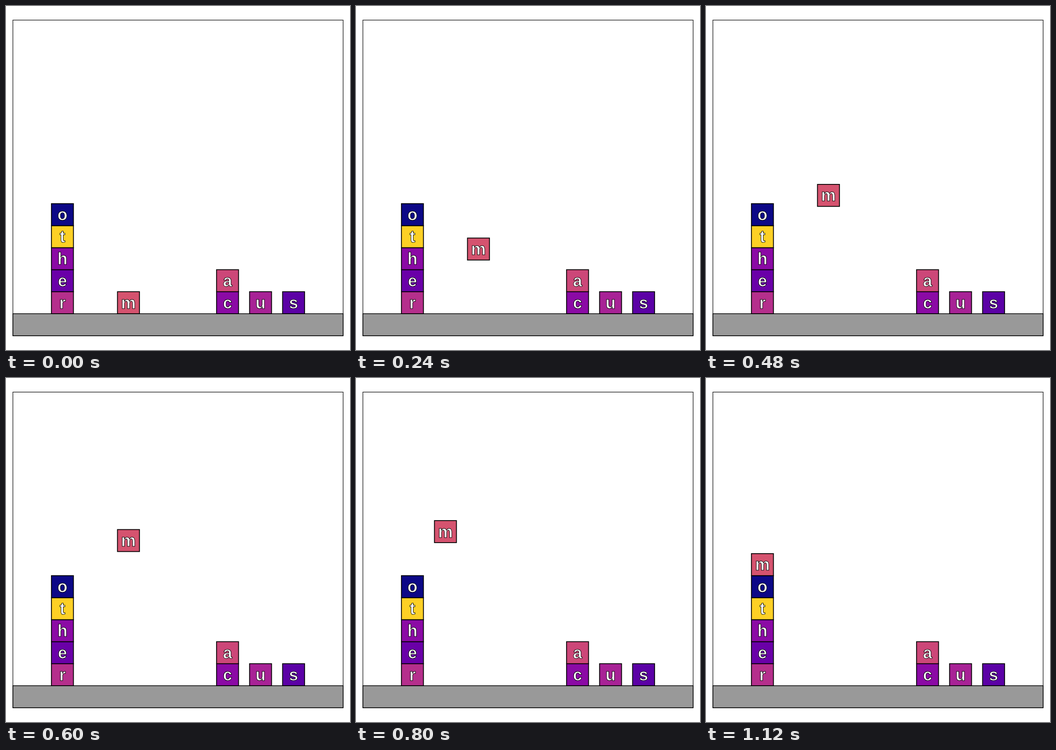
An HTML page that plays this animation: 748 px wide and 748 px high, repeating every 1.16 s.

```html
<!DOCTYPE html>
<html lang="en">
<head>
<meta charset="utf-8">
<title>Stacking blocks</title>
<style>
  html, body { margin: 0; width: 100%; height: 100%; overflow: hidden; background: #fff; }
  svg { display: block; width: 100vw; height: 100vh; }
  rect { stroke: #000; stroke-width: 1.8; }
  text {
    font: bold 36px "Liberation Sans", Arial, sans-serif;
    text-anchor: middle; fill: #fff; stroke: #000; stroke-width: 1;
  }
</style>
</head>
<body>
<svg id="stage" viewBox="0 0 748 748"></svg>
<script>
const NS = "http://www.w3.org/2000/svg";
const stage = document.getElementById("stage");
const UNIT = 47.87, LEFT = 15, FLOOR = 669.1;
const STEP = 40, STEPS = 29;

function add(parent, tag, attrs, content = "") {
  const node = document.createElementNS(NS, tag);
  for (const key in attrs) node.setAttribute(key, attrs[key]);
  node.textContent = content;
  parent.appendChild(node);
  return node;
}

// Columns are 1.5 blocks apart; level 0 rests on the ground.
function place(block, column, level) {
  const x = LEFT + UNIT * (2.25 + 1.5 * column);
  const y = FLOOR - UNIT * (level + 0.5);
  block.setAttribute("transform", `translate(${x.toFixed(2)} ${y.toFixed(2)})`);
}

function addBlock(letter, color, column, level) {
  const block = add(stage, "g", {});
  add(block, "rect", { x: -UNIT / 2, y: -UNIT / 2, width: UNIT, height: UNIT, fill: color });
  add(block, "text", { y: 12.5 }, letter);
  place(block, column, level);
  return block;
}

add(stage, "rect", {
  x: LEFT, y: 30.6, width: 15 * UNIT, height: 686.4, fill: "none", style: "stroke-width:1.2"
});
add(stage, "rect", { x: LEFT, y: FLOOR, width: 15 * UNIT, height: UNIT, fill: "#999", style: "stroke-width:1.5" });

[
  ["r", "#b52f8c", 0, 0], ["e", "#6a00a8", 0, 1], ["h", "#8b0aa5", 0, 2],
  ["t", "#fdd025", 0, 3], ["o", "#0d0887", 0, 4],
  ["c", "#8b0aa5", 5, 0], ["a", "#cc4778", 5, 1],
  ["u", "#a82296", 6, 0], ["s", "#5c01a6", 7, 0]
].forEach(spec => addBlock(...spec));
const mover = addBlock("m", "#d5536f", 2, 0);

const progress = (step, start, end) => Math.min(1, Math.max(0, (step - start) / (end - start)));

// Lift, carry across, lower onto the tower.
function render(time) {
  const step = Math.floor(time / STEP) % STEPS;
  const lift = progress(step, 0, 16);
  const carry = progress(step, 16, 24);
  const lower = progress(step, 24, 28);
  place(mover, 2 - 2 * carry, 6.5 * lift - 1.5 * lower);
}

const start = performance.now();
function tick() {
  render(performance.now() - start);
  requestAnimationFrame(tick);
}
tick();
</script>
</body>
</html>
```
